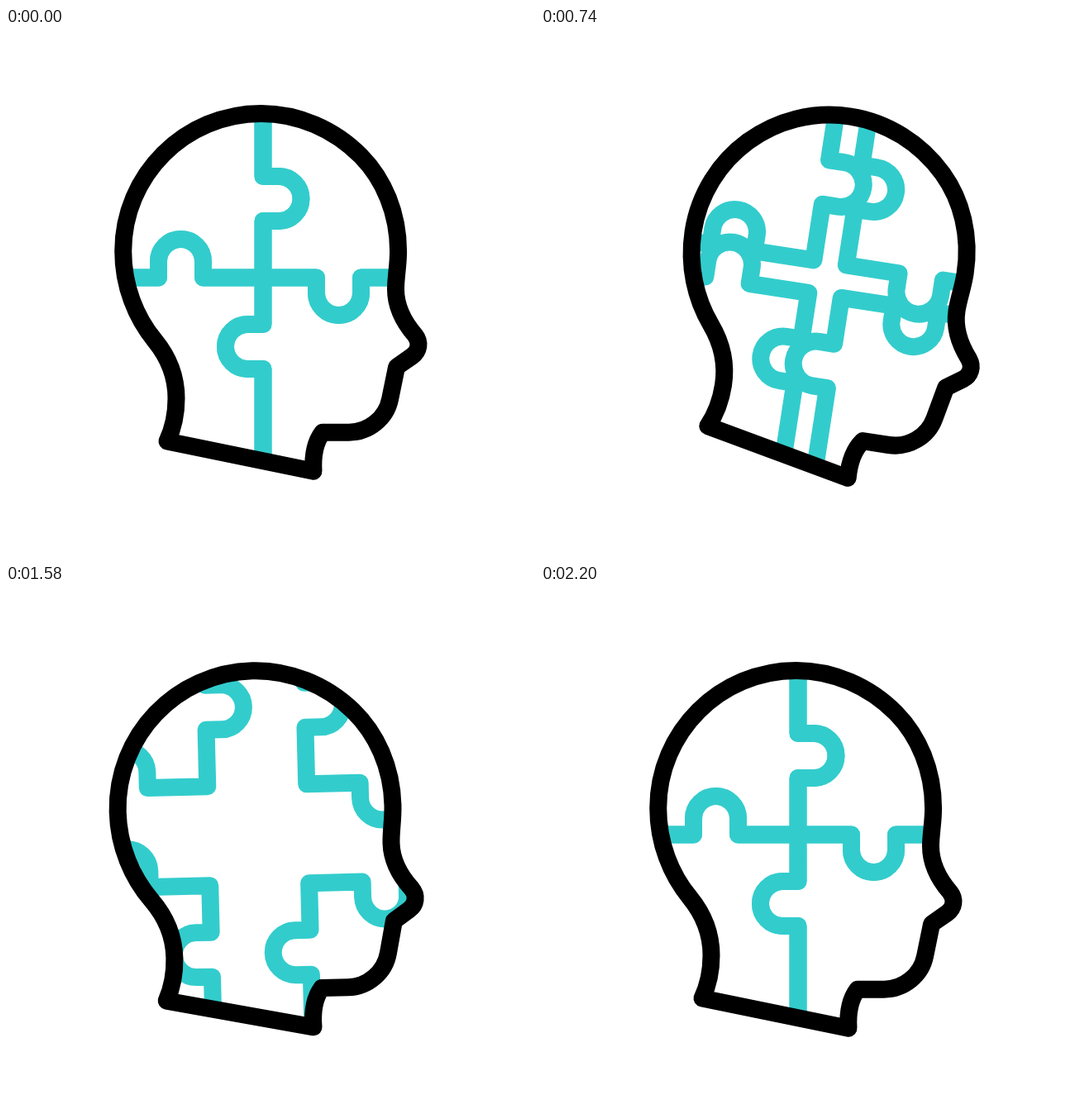
An HTML page with a canvas for the animation above (2400 ms loop, 640 by 640 pixels).

```html
<!DOCTYPE html>
<html lang="en">
<head>
<meta charset="utf-8">
<title>Puzzle mind</title>
<style>
  html, body { margin: 0; width: 100%; height: 100%; overflow: hidden; background: #fff; }
  canvas { display: block; width: 640px; height: 640px; }
</style>
</head>
<body>
<canvas id="stage" width="640" height="640"></canvas>
<script>
const ctx = document.getElementById('stage').getContext('2d');
const LOOP = 2400;
const PIVOT = { x: 318, y: 535 };

// Keys are [time, value], eased in and out between neighbours.
const TILT = [[200, 0], [800, 9], [1400, -7], [1800, 6], [2200, 0]];
const SPREAD = [[200, 0], [1600, 60], [2200, 0]];

const head = new Path2D(`
  M141.7 270 C141.7 178 216.5 103.4 308.7 103.4
  C353 103.4 397 122 429.5 155 C457 183 474.6 224 474.6 270
  C474.6 288 471.5 301 471.5 316 C471.5 338 480.6 355 494.8 371.5
  C501.5 380 500 391 491.3 397 L472.6 410 L464.6 449
  C460 472 439 489.2 415 489.2 L383 489.2
  C374 501 371 519 372 536.2 L195 500
  C202 485 206 467 206 448 C206 424 198 400 180 378
  C157 350 141.7 312 141.7 270 Z`);

// Each seam runs from the centre of the puzzle out to the edge of the head.
const seams = {
  up: 'M311 302 V233.5 H330 A27 27 0 0 0 330 179.5 H311 V60',
  down: 'M311 302 V358.5 H292.5 A27 27 0 0 0 292.5 412.5 H311 V580',
  left: 'M311 302 H238.5 V282.5 A27 27 0 0 0 184.5 282.5 V302 H90',
  right: 'M311 302 H375.5 V320.5 A27 27 0 0 0 429.5 320.5 V302 H540'
};

const piece = (dx, dy) => ({
  dx, dy,
  path: new Path2D(seams[dx < 0 ? 'left' : 'right'] + seams[dy < 0 ? 'up' : 'down'])
});
const pieces = [piece(-1, -1), piece(1, -1), piece(-1, 1), piece(1, 1)];

function valueAt(keys, t) {
  if (t <= keys[0][0]) return keys[0][1];
  for (let i = 1; i < keys.length; i++) {
    const [t0, a] = keys[i - 1], [t1, b] = keys[i];
    if (t < t1) {
      const u = (t - t0) / (t1 - t0);
      return a + (b - a) * u * u * (3 - 2 * u);
    }
  }
  return keys[keys.length - 1][1];
}

function draw(t) {
  const spread = valueAt(SPREAD, t);
  ctx.fillStyle = '#fff';
  ctx.fillRect(0, 0, 640, 640);
  ctx.lineJoin = ctx.lineCap = 'round';
  ctx.lineWidth = 21;

  ctx.save();
  ctx.translate(PIVOT.x, PIVOT.y);
  ctx.rotate(valueAt(TILT, t) * Math.PI / 180);
  ctx.translate(-PIVOT.x, -PIVOT.y);

  ctx.save();
  ctx.clip(head);
  ctx.strokeStyle = '#33cccc';
  for (const p of pieces) {
    ctx.save();
    ctx.translate(p.dx * spread, p.dy * spread);
    ctx.stroke(p.path);
    ctx.restore();
  }
  ctx.restore();

  ctx.strokeStyle = '#000';
  ctx.stroke(head);
  ctx.restore();
}

const start = performance.now();
function tick() {
  draw((performance.now() - start) % LOOP);
  requestAnimationFrame(tick);
}
tick();
</script>
</body>
</html>
```
